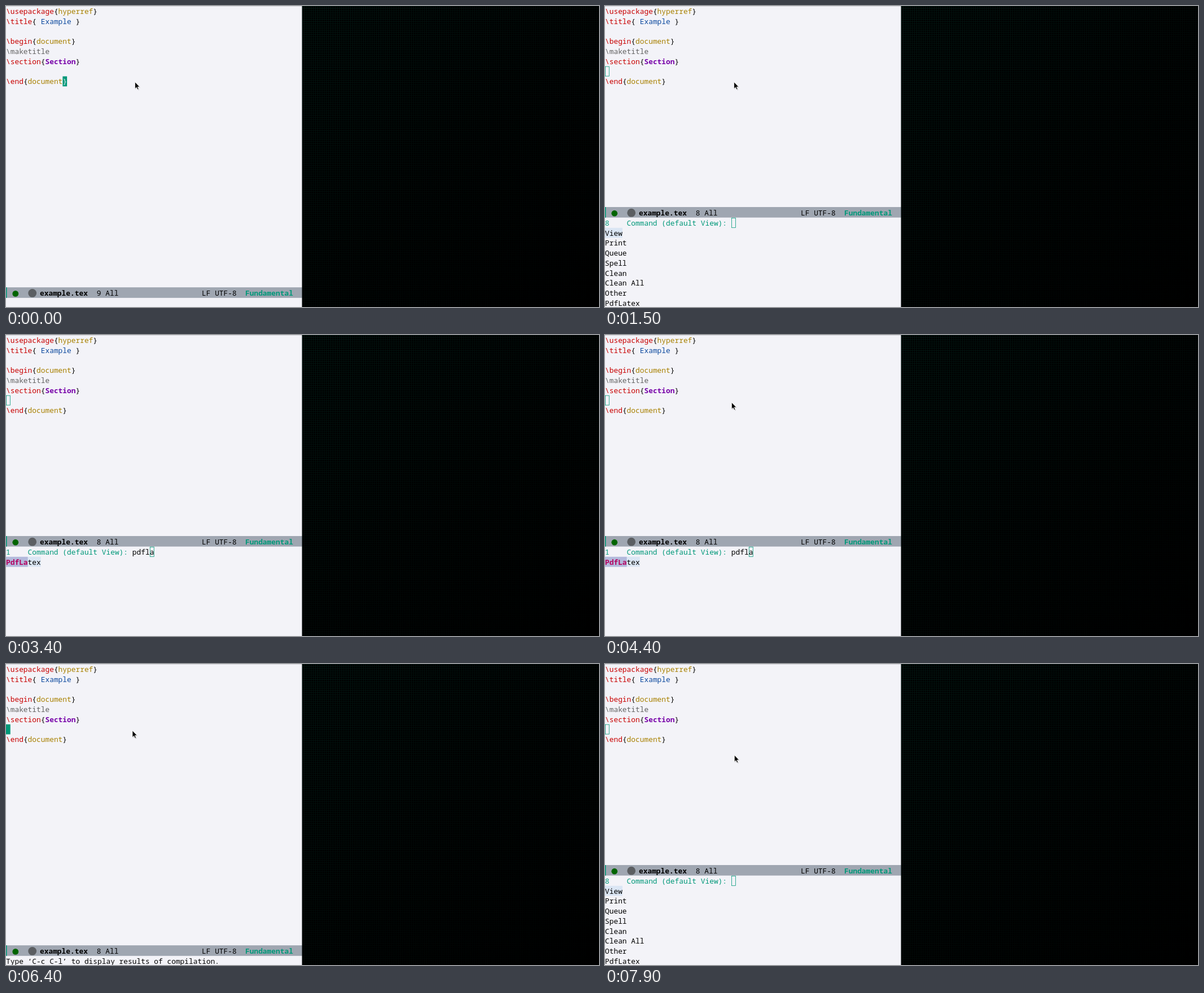
Animation, 1051 px wide and 533 px high, one loop 8000 ms. Source, as an HTML page:

```html
<!DOCTYPE html>
<html lang="en">
<head>
<meta charset="utf-8">
<title>Editor session</title>
<style>
  html, body { margin: 0; width: 100%; height: 100%; overflow: hidden; background: #f3f3f8; }
  svg { display: block; width: 1051px; height: 533px; }
  text { font: 12.87px "Noto Sans Mono", "DejaVu Sans Mono", monospace; white-space: pre; fill: #000; }
  .bold { font-weight: 700; }
  .red { fill: #c80000; }
  .gold { fill: #a88000; }
  .blue { fill: #0f4b9f; }
  .grey { fill: #626262; }
  .purple { fill: #7600a8; font-weight: 700; }
  .teal { fill: #009879; }
  .match { fill: #b5005f; font-weight: 700; }
</style>
</head>
<body>
<svg viewBox="0 0 1051 533" xmlns="http://www.w3.org/2000/svg">
  <defs>
    <pattern id="grid" x="525" width="3.86" height="3.86" patternUnits="userSpaceOnUse">
      <path d="M0 .4H3.86M.4 0V3.86" stroke="#03281f" stroke-width=".77"/>
    </pattern>
    <linearGradient id="fade" x1="0" y1="0" x2="1" y2="1">
      <stop offset="0" stop-color="#000" stop-opacity=".3"/>
      <stop offset=".5" stop-color="#000" stop-opacity=".72"/>
      <stop offset="1" stop-color="#000"/>
    </linearGradient>
  </defs>
  <rect width="525" height="533" fill="#f3f3f8"/>
  <rect width="525" height="1" fill="#d3d3d9"/>
  <g id="buffer"></g>
  <g id="screen"></g>
  <g id="pointer">
    <path d="M1 1V13.2L3.8 10.6 5.7 14.8 7.7 13.9 5.9 9.8H9.5Z" fill="#000" opacity=".18"/>
    <path d="M0 0V12L2.7 9.5 4.6 13.6 6.5 12.7 4.7 8.8H8.3Z" stroke="#fff" stroke-width=".8" fill="#000"/>
  </g>
  <rect x="524.6" width="526.4" height="533" fill="#000"/>
  <rect x="525" width="526" height="533" fill="url(#grid)"/>
  <rect x="525" width="526" height="533" fill="url(#fade)"/>
</svg>
<script>
const LOOP = 8000, STEP = 100;
const CELL = 7.725, ROW = 17.75, ASCENT = 13.9;
const BUFFER_TOP = .3, MINI_TOP = 375, ECHO_TOP = 517;
const MODE_HEIGHT = 18.6;
const TEAL = '#009879';
const $ = id => document.getElementById(id);

const span = (cls, s) => `<tspan class="${cls}">${s}</tspan>`;
const line = (x, top, content, cls = '') =>
  `<text x="${x}" y="${top + ASCENT}" class="${cls}">${content}</text>`;
const band = (col, cols, top, color) =>
  `<rect x="${col * CELL}" y="${top}" width="${cols * CELL}" height="${ROW}" fill="${color}"/>`;
const hollow = (col, top) =>
  `<rect x="${col * CELL + .4}" y="${top + .4}" width="${CELL - .8}" height="${ROW - .8}"
    fill="none" stroke="${TEAL}" stroke-width=".8"/>`;
const solid = (col, top, char = '') =>
  band(col, 1, top, TEAL) + `<text x="${col * CELL}" y="${top + ASCENT}" style="fill:#f3f3f8">${char}</text>`;
const bufferRow = i => BUFFER_TOP + i * ROW;
const within = (t, from, to) => t >= from && t < to;
const command = (name, arg, cls) => `${span('red', '\\' + name)}{${span(cls, arg)}}`;

$('buffer').innerHTML = [
  command('usepackage', 'hyperref', 'gold'),
  command('title', ' Example ', 'blue'),
  '',
  command('begin', 'document', 'gold'),
  span('grey', '\\maketitle'),
  command('section', 'Section', 'purple'),
  '',
  command('end', 'document', 'gold')
].map((content, i) => line(0, bufferRow(i), content)).join('');

function modeLine(top, lineNumber) {
  const textTop = top + .8;
  return `<rect y="${top}" width="525" height="${MODE_HEIGHT}" fill="#9fa6b1"/>
    <rect y="${top}" width="1.5" height="${MODE_HEIGHT}" fill="${TEAL}"/>
    <circle cx="16.8" cy="${top + 11.2}" r="5.4" fill="#006400"/>
    <circle cx="46.7" cy="${top + 10.2}" r="7.4" fill="#5b5e62"/>` +
    line(60, textTop, 'example.tex', 'bold') +
    line(160.8, textTop, lineNumber + ' All') +
    line(347, textTop, 'LF UTF-8') +
    line(424, textTop, 'Fundamental', 'teal bold');
}

function mainCursor(t) {
  const top = bufferRow(6);
  if (t < 400) return solid(13, bufferRow(7), '}');
  if (within(t, 600, 1100) || within(t, 6400, 6900) || within(t, 7400, 7900)) return solid(0, top);
  if (within(t, 1500, 6400) || t >= 7900) return hollow(0, top);
  return '';
}

function completion(t) {
  const choices = ['View', 'Print', 'Queue', 'Spell', 'Clean', 'Clean All', 'Other', 'PdfLatex'];
  const keyTimes = [2600, 2600, 2800, 2900, 3000];
  const typed = t >= 7900 ? 0 : keyTimes.filter(k => t >= k).length;
  const listTop = MINI_TOP + ROW;
  const prompt = span('teal', `${typed ? 1 : 8}    Command (default View): `) + 'pdfla'.slice(0, typed);
  let out = line(0, MINI_TOP, prompt);
  if (typed) {
    const name = choices[7];
    out += band(0, 8, listTop, '#dbe6f4') + band(0, typed, listTop, '#b3b9db') +
      line(0, listTop, span('match', name.slice(0, typed)) + name.slice(typed));
  } else {
    out += band(0, 4, listTop, '#dbe6f4') +
      choices.map((name, i) => line(0, listTop + i * ROW, name)).join('');
  }
  const blinkedOff = within(t, 2000, 2600) || within(t, 3900, 4400);
  const col = within(t, 3400, 4500) ? 33 : 29 + typed;
  return out + (blinkedOff ? '' : hollow(col, MINI_TOP));
}

function echoArea(t) {
  if (within(t, 4500, 6400)) {
    const on = t < 5100 || within(t, 5600, 6100);
    return line(0, ECHO_TOP, span('teal', 'PdfLatex command: ') +
      'pdflatex -interaction=nonstopmode example') + (on ? hollow(59, ECHO_TOP) : '');
  }
  if (within(t, 6400, 6800)) return line(0, ECHO_TOP, 'Type ‘C-c C-l’ to display results of compilation.');
  if (t >= 6800) return line(0, ECHO_TOP, 'PdfLatex: done.');
  return '';
}

function placePointer(t) {
  const glide = (from, to) => {
    const p = Math.min(1, Math.max(0, (t - from) / (to - from)));
    return p * p * (3 - 2 * p);
  };
  const up = glide(3500, 4600), down = glide(7200, 7900);
  const x = 228.6 - 4.6 * up + 5.3 * down;
  const y = 134.5 - 16.7 * up + 43.5 * down;
  const hidden = within(t, 2600, 3600) || within(t, 5400, 6000);
  $('pointer').setAttribute('transform', `translate(${x} ${y})`);
  $('pointer').setAttribute('visibility', hidden ? 'hidden' : 'visible');
}

function render(t) {
  const choosing = within(t, 1500, 4500) || t >= 7900;
  $('screen').innerHTML = mainCursor(t) +
    modeLine(choosing ? 356 : 498.2, t < 600 ? 9 : 8) +
    (choosing ? completion(t) : echoArea(t));
  placePointer(t);
}

const start = performance.now();
let shown = -1;
function tick() {
  const elapsed = (performance.now() - start) % LOOP;
  const t = Math.floor(elapsed / STEP) * STEP;
  if (t !== shown) render(shown = t);
  requestAnimationFrame(tick);
}
tick();
</script>
</body>
</html>
```
